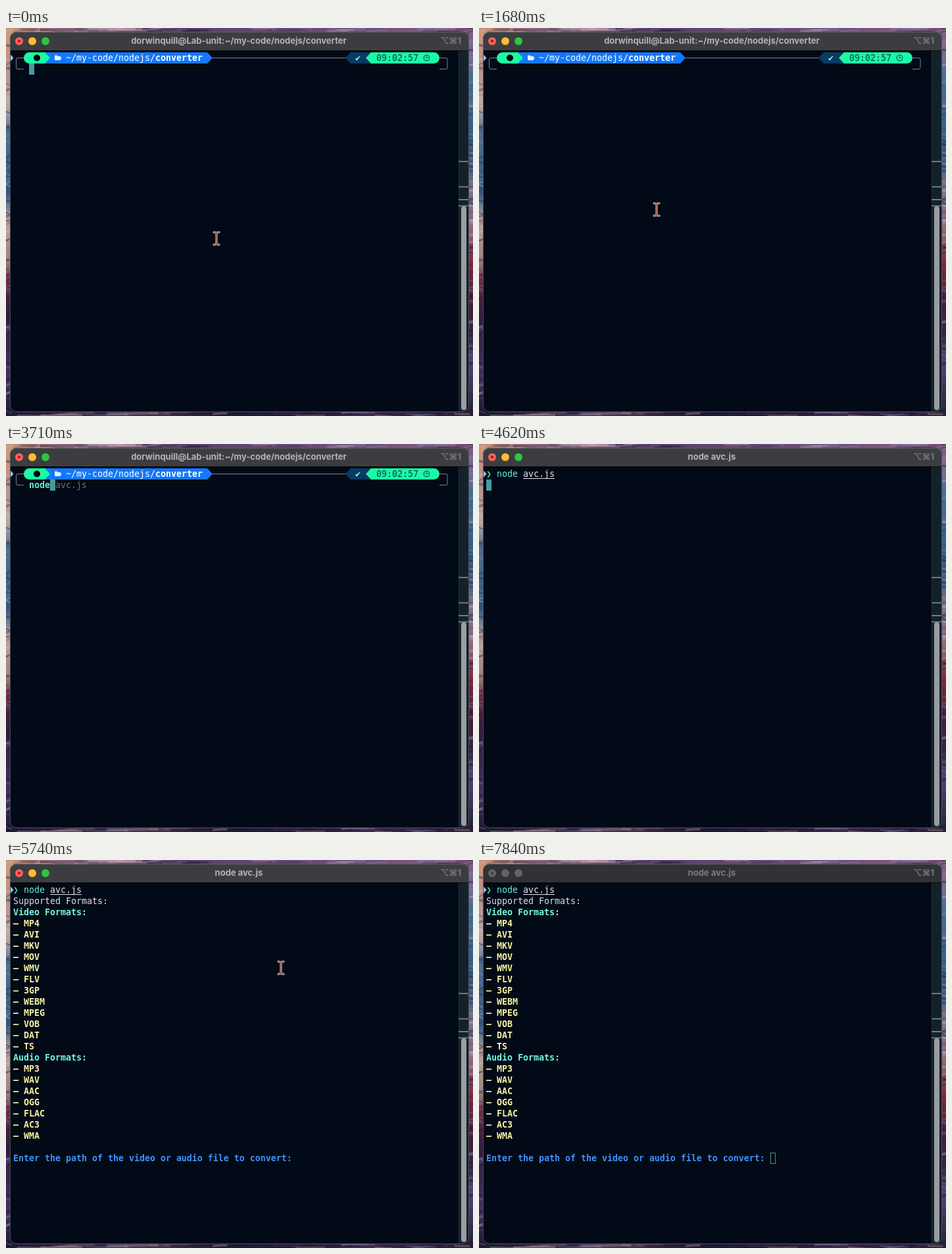
Animation of 710 by 590 pixels, one loop 8000 ms. Source, as an HTML page:

```html
<!DOCTYPE html>
<html lang="en">
<head>
<meta charset="utf-8">
<title>Terminal</title>
<style>
  html, body { margin: 0; width: 100%; height: 100%; overflow: hidden; background: #2a2140; }
  svg { display: block; width: 710px; height: 590px; }
  text { white-space: pre; }
  .mono { font: 13.29px "DejaVu Sans Mono", "Liberation Mono", monospace; }
  .ui { font: 700 13px Inter, "Liberation Sans", sans-serif; }
  .bold { font-weight: 700; }
</style>
</head>
<body>
<svg viewBox="0 0 710 590">
  <defs>
    <linearGradient id="left" x2="0" y2="1">
      <stop offset="0" stop-color="#d09a78"/><stop offset=".1" stop-color="#b98d8a"/>
      <stop offset=".2" stop-color="#bda9a4"/><stop offset=".27" stop-color="#4f7096"/>
      <stop offset=".42" stop-color="#2b5681"/><stop offset=".5" stop-color="#b9a79c"/>
      <stop offset=".6" stop-color="#a08078"/><stop offset=".66" stop-color="#6a2540"/>
      <stop offset=".74" stop-color="#301c40"/><stop offset=".9" stop-color="#413260"/>
      <stop offset="1" stop-color="#1b1730"/>
    </linearGradient>
    <linearGradient id="right" x2="0" y2="1">
      <stop offset="0" stop-color="#8a5c84"/><stop offset=".07" stop-color="#7a6a92"/>
      <stop offset=".13" stop-color="#3f6d98"/><stop offset=".32" stop-color="#31597f"/>
      <stop offset=".42" stop-color="#7a7490"/><stop offset=".52" stop-color="#8f6880"/>
      <stop offset=".6" stop-color="#852b48"/><stop offset=".7" stop-color="#511d3a"/>
      <stop offset=".78" stop-color="#352549"/><stop offset=".86" stop-color="#524476"/>
      <stop offset="1" stop-color="#261d3c"/>
    </linearGradient>
    <linearGradient id="top">
      <stop offset="0" stop-color="#d09a78"/><stop offset=".1" stop-color="#94647a"/>
      <stop offset=".3" stop-color="#54406c"/><stop offset=".7" stop-color="#6c4a78"/>
      <stop offset="1" stop-color="#8a5c84"/>
    </linearGradient>
    <linearGradient id="bottom">
      <stop offset="0" stop-color="#1d1832"/><stop offset=".25" stop-color="#4a3350"/>
      <stop offset=".5" stop-color="#1c1a34"/><stop offset=".75" stop-color="#41294c"/>
      <stop offset="1" stop-color="#261d3c"/>
    </linearGradient>
    <clipPath id="frame"><rect x="6" y="6" width="698" height="578" rx="10"/></clipPath>
  </defs>

  <rect width="355" height="590" fill="url(#left)"/>
  <rect x="355" width="355" height="590" fill="url(#right)"/>
  <rect width="710" height="10" fill="url(#top)"/>
  <rect y="580" width="710" height="10" fill="url(#bottom)"/>
  <g id="brushwork" fill="none"></g>

  <g clip-path="url(#frame)">
    <rect x="6" y="6" width="698" height="578" fill="#010a16"/>
    <rect id="titlebar" x="6" y="6" width="698" height="28"/>
    <rect x="6" y="34" width="698" height="1" fill="#05070b"/>
    <rect x="688" y="35" width="16" height="549" fill="#13212a"/>
    <rect x="688" y="35" width="1" height="549" fill="#24323b"/>
    <path d="M688 203h15M688 241.500h15M688 261h15M688 270.500h15" stroke="#77777b" stroke-width="2"/>
    <rect x="692" y="271" width="8" height="310" rx="4" fill="#9b9ca1"/>
  </g>
  <rect x="6.500" y="6.500" width="697" height="577" rx="9.500" fill="none" stroke="#67686c" stroke-opacity=".7"/>

  <g id="lights"><circle cx="20" cy="20" r="6"/><circle cx="40" cy="20" r="6"/><circle cx="60" cy="20" r="6"/></g>
  <circle id="dot" cx="20" cy="20" r="2"/>
  <text id="title" class="ui" x="354" y="24" text-anchor="middle"></text>
  <text class="ui" x="692" y="23.500" text-anchor="end" fill="#77787b">⌥⌘1</text>

  <path d="M7 40.500l4.500 5-4.500 5z" fill="#8ec8f4"/>

  <g id="prompt">
    <path d="M27 45.500H18q-2.500 0-2.500 2.500V60q0 2.500 2.500 2.500H27M314 45.500H517M659 45.500H668.500q2.500 0 2.500 2.500V60q0 2.500-2.500 2.500H659"
          fill="none" stroke="#828484"/>
    <path d="M57 37H306l8 8.500-8 8.500H57z" fill="#1478fb"/>
    <path d="M35.500 37H59l8 8.500-8 8.500H35.500a8.500 8.500 0 0 1 0-17z" fill="#1bfaa4"/>
    <circle cx="47" cy="45.500" r="5"/>
    <path d="M74 42.500q0-1 1-1h2.500l1.200 1.200h3q1 0 1 1v.8h1.800l-1.800 4.500H75q-1 0-1-1z" fill="#e9f2ff"/>
    <path d="M516 45.500l8-8.500H556V54H524z" fill="#093b63"/>
    <path d="M547 45.500l8-8.500H650.500a8.500 8.500 0 0 1 0 17H555z" fill="#1bfaa4"/>
    <g fill="none" stroke="#0b4050" stroke-width="1.100"><circle cx="639.500" cy="45.500" r="4.300"/><path d="M639.500 43v2.500h2"/></g>
  </g>
  <rect id="cursor"/>
  <g id="command"></g>
  <g id="output"></g>

  <path id="flash" d="M7 584V35.700H687V584" fill="none" stroke="#7df7b6" stroke-width="1.600"/>

  <g id="mouse" fill="none" stroke-linecap="round">
    <path id="beam" d="M-4-9.500q4 0 4 3V6.500q0 3-4 3M4-9.500q-4 0-4 3M0 6.500q0 3 4 3" stroke="#cbb8b6" stroke-width="3.200"/>
    <path d="M-4-9.500q4 0 4 3V6.500q0 3-4 3M4-9.500q-4 0-4 3M0 6.500q0 3 4 3" stroke="#6a4241" stroke-width="1.200"/>
    <path d="M0-6V6" stroke="#b9645a" stroke-width="1.800"/>
  </g>
</svg>

<script>
const LOOP = 8000, STEP = 70, CELL = 8, LINE = 17;
const $ = id => document.getElementById(id);
const colX = col => 11 + CELL * col;
const set = (id, attrs) => { for (const k in attrs) $(id).setAttribute(k, attrs[k]); };
const show = (id, on) => { $(id).style.display = on ? '' : 'none'; };
const text = (col, row, str, fill, cls = '') =>
  `<text class="mono ${cls}" x="${colX(col)}" y="${50 + LINE * row}" fill="${fill}">${str}</text>`;
const underline = (col, row, len) =>
  `<rect x="${colX(col)}" y="${52 + LINE * row}" width="${CELL * len}" height="1" fill="#e4e6ee"/>`;

const TEAL = '#62efd2', WHITE = '#e4e6ee';
const COMMAND = 'node avc.js';
const VIDEO = 'MP4 AVI MKV MOV WMV FLV 3GP WEBM MPEG VOB DAT TS'.split(' ');
const AUDIO = 'MP3 WAV AAC OGG FLAC AC3 WMA'.split(' ');

// Painterly strokes on the strip of wallpaper around the window
let seed = 11;
const random = () => (seed = seed * 16807 % 2147483647) / 2147483647;
const pick = list => list[Math.floor(random() * list.length)];
const stroke = (x, y, dx, dy) =>
  `<path d="M${x} ${y}q${dx / 2} ${dy} ${dx} ${dy}" stroke="${pick(['#181430', '#181430', '#d9b0b0', '#7d93bd'])}"
    stroke-width="${1 + 3 * random()}" stroke-opacity="${.15 + .3 * random()}"/>`;
for (let i = 0; i < 90; i++) {
  $('brushwork').innerHTML +=
    stroke(-2, 590 * random(), 12, 12 * random() - 6) +
    stroke(700, 590 * random(), 12, 12 * random() - 6) +
    stroke(710 * random(), pick([1, 3, 5, 585, 587, 589]), 20 + 50 * random(), 4 * random() - 2);
}

$('prompt').innerHTML +=
  text(10, 0, '~/my-code/nodejs/', '#fff') + text(27, 0, 'converter', '#fff', 'bold') +
  text(65, 0, '✔', '#8bf7e0') + text(69, 0, '09:02:57', '#0b4050');

const list = (heading, items, row) => text(0, row, heading, '#74f6dd', 'bold') +
  items.map((name, i) => text(0, row + 1 + i, '– ' + name, '#f5f1a3', 'bold')).join('');
$('output').innerHTML = text(0, 1, 'Supported Formats:', '#dfdfea') +
  list('Video Formats:', VIDEO, 2) + list('Audio Formats:', AUDIO, 15) +
  text(0, 24, 'Enter the path of the video or audio file to convert:', '#4190f7', 'bold');

// Event times in ms
const TYPED = [3360, 3430, 3570, 3640], ACCEPT = 4340, ENTER = 4480, TITLE = 4620, OUTPUT = 4690, BLUR = 7000;

function commandLine(t) {
  if (t >= ENTER)
    return text(0, 0, '❯', '#3be38a', 'bold') + text(2, 0, 'node', TEAL) + text(7, 0, 'avc.js', WHITE) + underline(7, 0, 6);
  if (t >= ACCEPT)
    return text(3, 1, 'node', TEAL, 'bold') + text(8, 1, 'avc.js', WHITE) + underline(8, 1, 6);
  const n = TYPED.filter(at => t >= at).length;
  if (!n) return '';
  return text(3, 1, COMMAND.slice(0, n), n < 4 ? '#ff5f5a' : TEAL, 'bold') +
    text(3 + n, 1, COMMAND.slice(n), '#6b7075');
}

function drawCursor(t) {
  let col = 3, row = 1, on = true;
  if (t < TYPED[0]) on = Math.floor(t / 560) % 2 === 0;
  else if (t < ACCEPT) col += TYPED.filter(at => t >= at).length;
  else if (t < ENTER) col += COMMAND.length;
  else if (t < OUTPUT) col = 0;
  else {
    col = 54; row = 24;
    on = t >= BLUR || Math.floor((t - 4970) / 560) % 2 === 0;
  }
  const hollow = t >= BLUR, inset = hollow ? .5 : 0;
  show('cursor', on);
  set('cursor', {
    x: colX(col) + inset, y: 37 + LINE * row + inset,
    width: CELL - 2 * inset, height: LINE - 2 * inset,
    fill: hollow ? 'none' : '#4899a1', stroke: hollow ? '#3d9a93' : 'none'
  });
}

function drawMouse(t) {
  const glide = (start, end, from, to) => {
    const u = Math.min(1, Math.max(0, (t - start) / (end - start))), e = u * u * (3 - 2 * u);
    return from.map((v, i) => v + (to[i] - v) * e);
  };
  const [x, y] = t < 5000 ? glide(70, 1400, [320, 320], [270, 276])
    : t < 6230 ? glide(5250, 5740, [270, 276], [418, 164])
    : glide(6160, 6860, [418, 164], [740, 40]);
  show('mouse', t < TYPED[0] || t >= 5320 && t < 6860);
  set('mouse', { transform: `translate(${x} ${y})` });
}

function draw(now) {
  const t = Math.floor(now % LOOP / STEP) * STEP;
  const active = t < BLUR;
  show('prompt', t < ENTER);
  show('output', t >= OUTPUT);
  $('command').innerHTML = commandLine(t);
  drawCursor(t);
  drawMouse(t);

  set('titlebar', { fill: active ? '#3c3d40' : '#303236' });
  set('title', { fill: active ? '#b3b4b6' : '#7b7c7f' });
  $('title').textContent = t < TITLE ? 'dorwinquill@Lab-unit:~/my-code/nodejs/converter' : COMMAND;
  ['#fe5f57', '#fdbc2e', '#28c840'].forEach((c, i) =>
    $('lights').children[i].setAttribute('fill', active ? c : '#626366'));
  set('dot', { fill: active ? '#8e1a12' : '#3a3b3e' });

  const fade = t < 2800 ? 0 : Math.max(0, 1 - (t - 2800) / 420);
  set('flash', { opacity: fade });
}

const begin = performance.now();
function frame() {
  draw(performance.now() - begin);
  requestAnimationFrame(frame);
}
frame();
</script>
</body>
</html>
```
